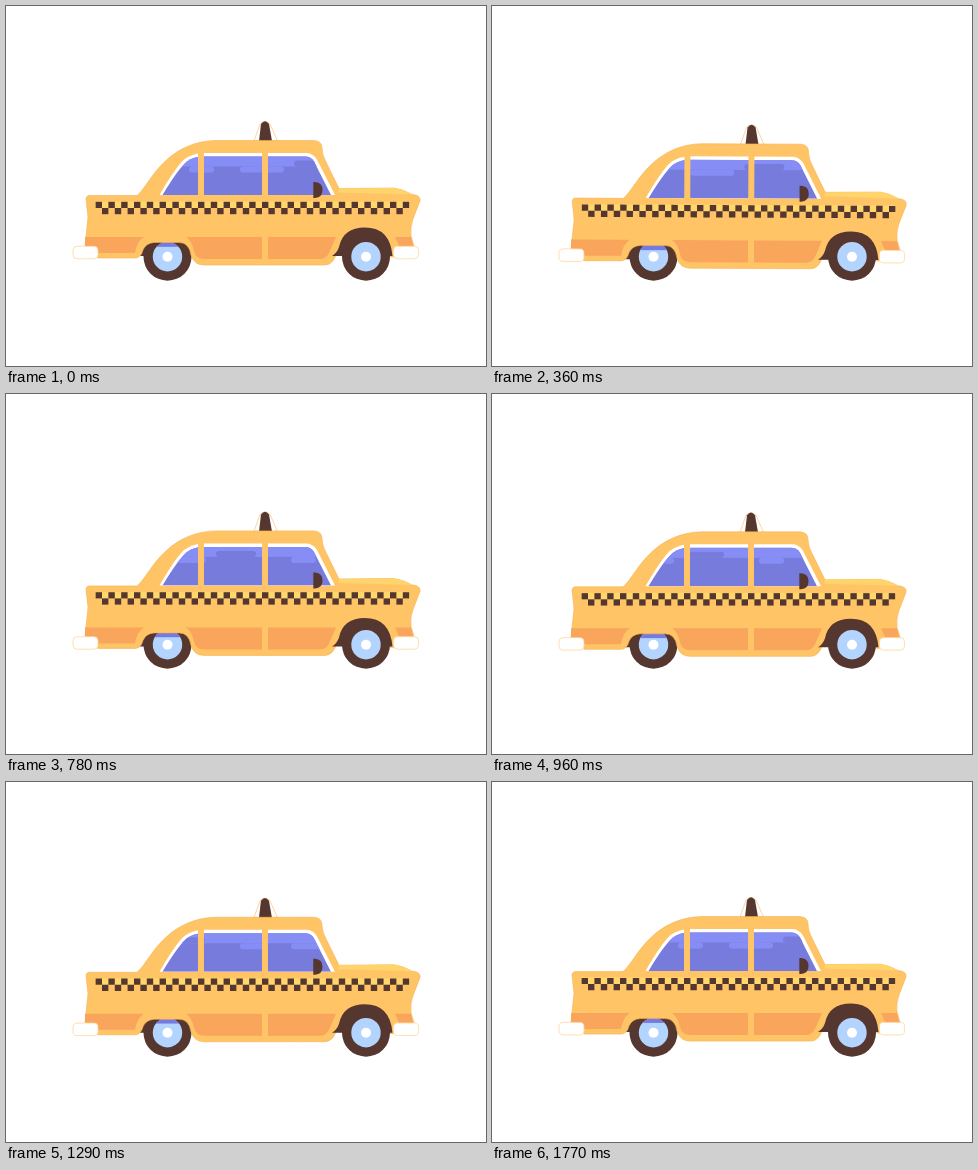
Recreate the animation shown at these times as an HTML page. Size 480 by 360 pixels, loop 1800 ms.

```html
<!DOCTYPE html>
<html lang="en">
<head>
<meta charset="utf-8">
<title>Taxi</title>
<style>
  html, body { margin: 0; width: 100%; height: 100%; overflow: hidden; background: #fff; }
  svg { display: block; width: 100vw; height: 100vh; }
</style>
</head>
<body>
<svg viewBox="0 0 480 360">
  <defs>
    <clipPath id="glassClip">
      <path d="M156.500 189Q172 163 181 155.500Q188 150.500 197 150.500H299Q305 150.500 308 155.500L325 189Z"/>
    </clipPath>
    <clipPath id="hubClip"><circle cx="161.500" cy="250.700" r="14.700"/></clipPath>
    <g id="wheel">
      <circle r="24" fill="#55372f"/>
      <circle r="14.700" fill="#b3d4ff"/>
      <circle r="5" fill="#fff"/>
    </g>
    <rect id="bumper" width="25" height="12.500" rx="4" fill="#fff" stroke="#ffd7a0" stroke-width=".8"/>
  </defs>

  <path id="underside" d="M131 250V244L142 237H184V250Z" fill="#55372f"/>
  <use href="#wheel" x="161.500" y="250.700"/>
  <g clip-path="url(#hubClip)">
    <rect id="shade" x="140" y="225" width="44" height="15.800" fill="#747ae0"/>
  </g>

  <g id="car">
    <path d="M248 135L254 118Q259 113 264 118L271.500 135Z" fill="#fff" stroke="#ffc98a" stroke-width=".8"/>
    <path d="M253 135L255 118Q259 112.500 263 118L266 135Z" fill="#55372f"/>

    <path fill="#ffc466" stroke="#f7b050" stroke-width=".6" d="M83 189.500L131 189.500C139 183 146 167 160 154.500
      C172 143 190 134.500 210 134.500H308Q316 135 316 142Q316 149 320.500 157L333 182.500L388 182Q398 183.500 406 188.500
      Q415 189 414 195L407 213Q404 221 405 230L408 240V251H386L332 243Q328 259 319 259H198Q188 259 185 249
      Q183 236.500 173 236.500H148Q140 237 137 244Q135 252 129 252H92L79 240L82 211L80 193Q80 190 83 189.500Z"/>
    <path d="M332 186.500L333 182.500L388 182Q398 183.500 406 188.500L390 188Z" fill="#ffd46b"/>

    <path fill="#f9a55c" d="M79 231H138Q131 235 129 247H92L79 240Z
      M180 231H256V253H198Q190 253 188 245Q186 235 180 231Z
      M262 231H330L323 247Q320 253 314 253H262Z
      M389 231H405L407 240H393Z"/>

    <path d="M153.500 189Q169 162 178 153.500Q187 147 197 147H301Q307 147.500 311 153.500L329 189Z" fill="#fff"/>
    <g clip-path="url(#glassClip)">
      <rect x="150" y="145" width="180" height="46" fill="#777bdc"/>
      <rect x="150" y="145" width="180" height="15.500" fill="#868df5"/>
      <g id="streaks"></g>
    </g>
    <path d="M192 146H198V191H192ZM256 146H262V191H256Z" fill="#ffc466"/>
    <path d="M307.300 176H309Q316.500 176.500 316.500 184T309 192H307.300Z" fill="#55372f"/>

    <rect x="89" y="195.500" width="315" height="6.500" fill="#ffd76a"/>
    <g id="checks" fill="#55372f"></g>

    <path d="M326 250Q331 247 333 241Q337 221.500 359 221.500Q384 221.500 386.500 250Z" fill="#55372f"/>
    <use href="#bumper" x="67" y="240.300"/>
    <use href="#bumper" x="387.500" y="240.300"/>
  </g>
  <use href="#wheel" x="360" y="250.700"/>
</svg>
<script>
  const LOOP = 1800, STEP = 30, BOB = 600, TILE = 180;
  const TILTS = [0.3, 0, -0.1];
  const LIGHT = '#868df5', DARK = '#777bdc';
  const get = id => document.getElementById(id);

  function rect(parent, x, y, width, height, attrs = {}) {
    const node = document.createElementNS('http://www.w3.org/2000/svg', 'rect');
    for (const [key, value] of Object.entries({ x, y, width, height, ...attrs })) node.setAttribute(key, value);
    parent.append(node);
  }

  const CHECK = 6.4;
  for (let i = 0; i < 49; i++) {
    rect(get('checks'), 89.6 + i * CHECK, i % 2 ? 202 : 195.8, CHECK, 6.2);
  }

  // Reflections hang below or cut into the light band: [x, y, width, fill]
  const streaks = [[183, 160.5, 25, LIGHT], [234, 160.5, 44, LIGHT], [288, 154.5, 40, DARK]];
  for (let tile = 0; tile < 3; tile++) {
    for (const [x, y, width, fill] of streaks) {
      rect(get('streaks'), x + (tile - 1) * TILE, y, width, 6, { rx: 3, fill });
    }
  }

  function draw(time) {
    const t = Math.floor((time % LOOP) / STEP) * STEP;
    const lift = (1 - Math.cos(2 * Math.PI * t / BOB)) / 2;
    const dy = 3.7 * lift;
    const tilt = TILTS[Math.floor(t / BOB)] * lift;
    get('car').setAttribute('transform', `translate(0 ${dy}) rotate(${tilt} 240 240)`);
    for (const id of ['shade', 'underside']) get(id).setAttribute('transform', `translate(0 ${dy})`);
    get('streaks').setAttribute('transform', `translate(${-TILE * t / LOOP} 0)`);
  }

  const start = performance.now();
  function frame() {
    draw(performance.now() - start);
    requestAnimationFrame(frame);
  }
  frame();
</script>
</body>
</html>
```
